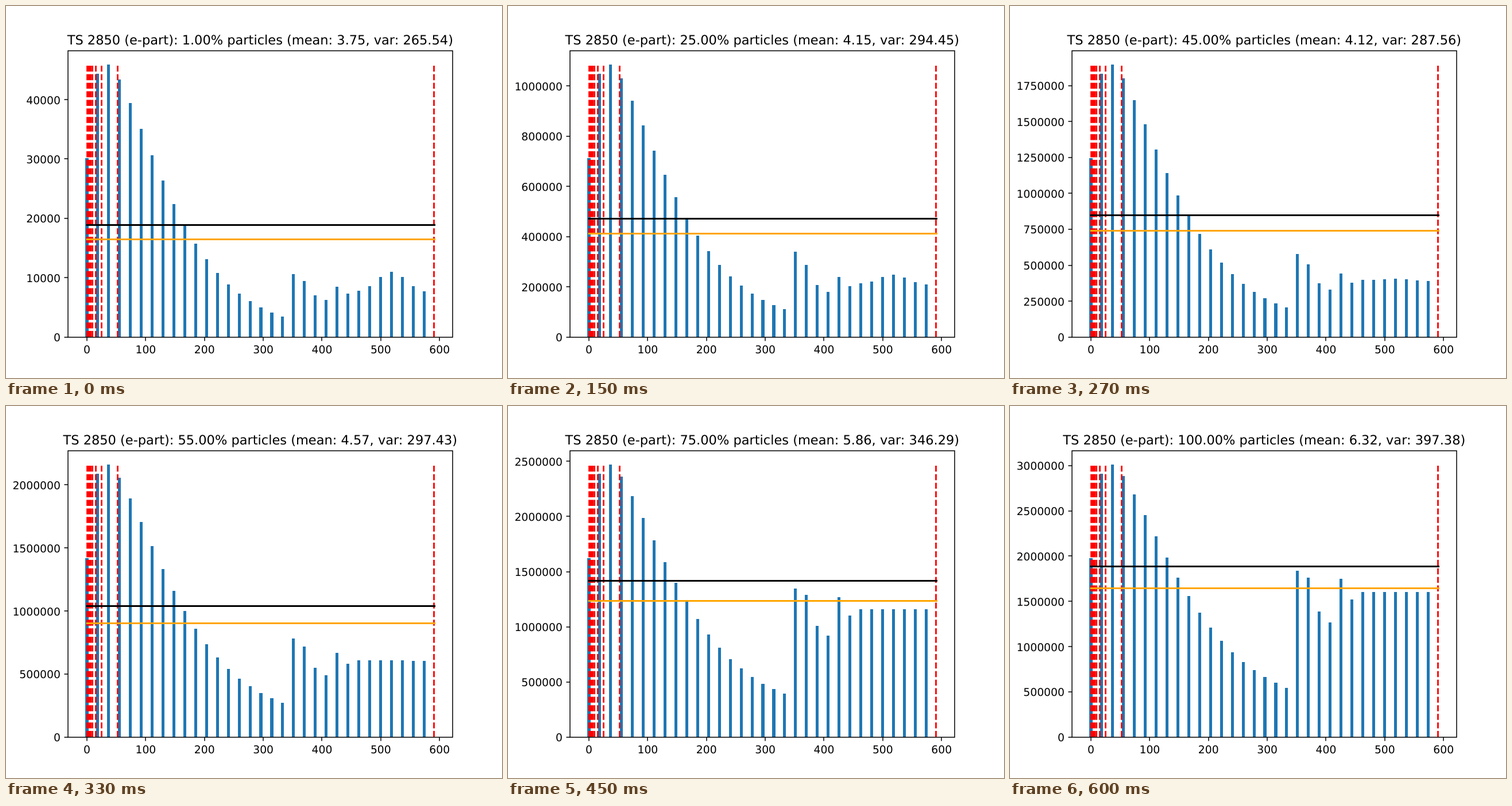
Write an HTML page that moves like this. It is 864 by 648 pixels and loops after 630 ms.

```html
<!DOCTYPE html>
<html lang="en">
<head>
<meta charset="utf-8">
<title>Particle histogram</title>
<style>
  html, body { margin: 0; width: 100%; height: 100%; overflow: hidden; background: #fff; }
  svg { display: block; width: 864px; height: 648px; font: 18.75px "DejaVu Sans", sans-serif; }
  text { fill: #000; text-rendering: geometricPrecision; }
  #title { font-size: 22.5px; text-anchor: middle; }
  #bars { fill: #1f77b4; }
  #cuts { fill: none; stroke: #f00; stroke-width: 2.81; stroke-dasharray: 10.41 4.5; }
  #levels { stroke-width: 2.81; }
  .axis { fill: none; stroke: #000; stroke-width: 1.5; }
  #xLabels { text-anchor: middle; }
  #yLabels { text-anchor: end; }
</style>
</head>
<body>
<svg viewBox="0 0 864 648">
  <path id="bars"/>
  <path id="cuts"/>
  <g id="levels">
    <path id="low" stroke="orange"/>
    <path id="high" stroke="#000"/>
  </g>
  <path class="axis" d="M108 78H778V577H108Z"/>
  <path class="axis" id="xTicks"/>
  <path class="axis" id="yTicks"/>
  <g id="xLabels"></g>
  <g id="yLabels"></g>
  <text id="title" x="442.8" y="66.5"></text>
</svg>
<script>
const STEP = 30, STEPS = 21;
const BARS = 32, PITCH = 18.938, BAR_WIDTH = 5.12;
const BASE = 576.72, PEAK = 475.2, ZERO_X = 141;
const el = id => document.getElementById(id);
const bell = (x, mid, width) => Math.exp(-(((x - mid) / width) ** 2));

// floor: height, relative to the peak, that the falling slope settles at
const keys = [
  { pct: 1, max: 45945, mean: 3.75, var: 265.54, floor: .028 },
  { pct: 15, max: 633330, mean: 4.31, var: 302.34, floor: .05 },
  { pct: 40, max: 1765200, mean: 3.90, var: 282.62, floor: .047 },
  { pct: 55, max: 2163400, mean: 4.57, var: 297.43, floor: .068 },
  { pct: 75, max: 2473450, mean: 5.86, var: 346.29, floor: .093 },
  { pct: 85, max: 2643500, mean: 6.02, var: 344.66, floor: .1 },
  { pct: 100, max: 3014000, mean: 6.32, var: 397.38, floor: .11 }
];

function stateAt(pct) {
  const i = Math.max(1, keys.findIndex(k => k.pct >= pct));
  const a = keys[i - 1], b = keys[i];
  const t = (pct - a.pct) / (b.pct - a.pct);
  const state = {};
  for (const name in a) state[name] = a[name] + (b[name] - a[name]) * t;
  return state;
}

// steep rise to the peak, then a stretched exponential fall
function slope(n, floor) {
  if (n < 0) return PEAK * (1 - .035 * (-n) ** 3.3);
  return PEAK * (floor + (1 - floor) * Math.exp(-(.062 - .115 * floor) * n ** 1.42));
}

// second population: a plateau with a ragged start
const ragged = [1.145, 1.1, .865, .79, 1.09, .95];
function plateau(j, { pct, floor }) {
  const level = 75 + 190 / (1 + Math.exp((.078 - floor) / .012));
  const early = 40 * bell(pct, 28, 30) * Math.exp(-j / 2);
  const late = 36 * bell(pct, 0, 30) * bell(j, 9, 1.8);
  return (level + early + late) * (ragged[j] ?? 1);
}

function bar(k, state) {
  const height = k < 19 ? slope(k - 2, state.floor) : plateau(k - 19, state);
  const left = ZERO_X + PITCH * k - BAR_WIDTH / 2;
  return `M${Math.round(left)} 577V${Math.round(BASE - height)}H${Math.round(left + BAR_WIDTH)}V577Z`;
}

function tickStep(range) {
  const unit = 10 ** Math.floor(Math.log10(range / 9));
  return unit * [1, 2, 2.5, 5, 10].find(m => range / (m * unit) <= 9);
}

function draw(step) {
  const pct = step ? step * 5 : 1;
  const s = stateAt(pct);
  const y = v => BASE - v / s.max * PEAK;
  const level = v => `M139.6 ${Math.ceil(y(v) - .5) - .5}H748`;

  el('title').textContent = `TS 2850 (e-part): ${pct.toFixed(2)}% particles ` +
    `(mean: ${s.mean.toFixed(2)}, var: ${s.var.toFixed(2)})`;
  el('bars').setAttribute('d', Array.from({ length: BARS }, (_, k) => bar(k, s)).join(''));
  el('high').setAttribute('d', level(18830 * pct));
  el('low').setAttribute('d', level(16400 * pct));

  const top = s.max * 1.05, gap = tickStep(top);
  let ticks = '', labels = '';
  for (let v = 0; v <= top; v += gap) {
    ticks += `M108 ${Math.round(y(v))}h-6.56`;
    labels += `<text x="94.9" y="${Math.round(y(v) + 7.5)}">${v}</text>`;
  }
  el('yTicks').setAttribute('d', ticks);
  el('yLabels').innerHTML = labels;
}

// fixed parts
const cutXs = [141.5, 143.5, 145.5, 147.5, 150.5, 156.5, 166.5, 194.5, 745.5];
el('cuts').setAttribute('d', cutXs.map(x => `M${x} 576.5v${-PEAK}`).join(''));
const xs = Array.from({ length: 7 }, (_, i) => ZERO_X + 102.37 * i);
el('xTicks').setAttribute('d', xs.map(x => `M${Math.round(x)} 577v6.56`).join(''));
el('xLabels').innerHTML = xs.map((x, i) => `<text x="${x}" y="604.5">${i * 100}</text>`).join('');

let shown = -1;
function tick() {
  const step = Math.floor(performance.now() / STEP) % STEPS;
  if (step !== shown) draw(shown = step);
  requestAnimationFrame(tick);
}
tick();
</script>
</body>
</html>
```
